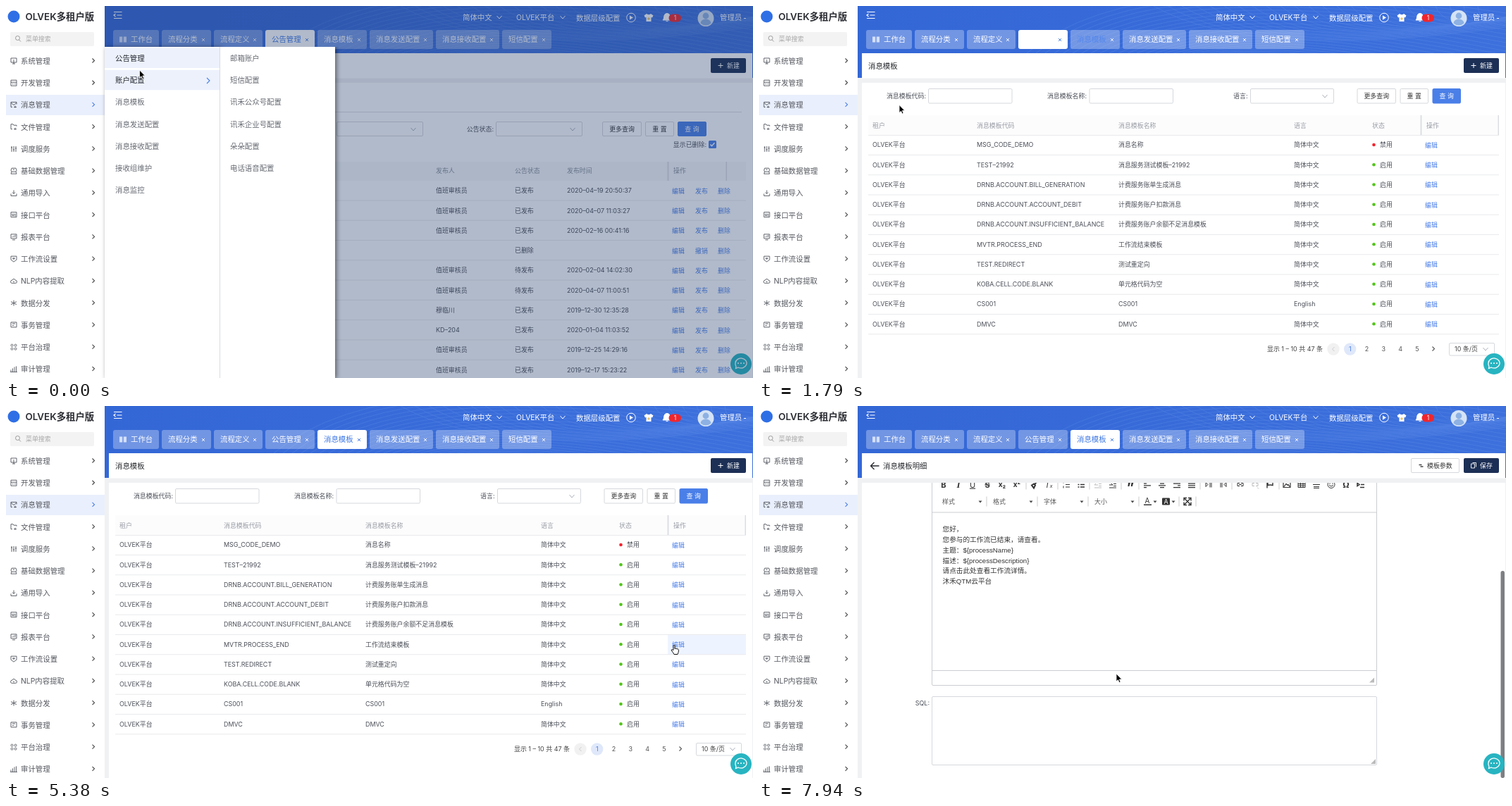
Animation of 1060x528 px, one loop 8 s. Source, as an HTML page:

```html
<!DOCTYPE html>
<html lang="zh-CN">
<head>
<meta charset="utf-8">
<title>消息模板</title>
<style>
html, body { margin: 0; width: 100%; height: 100%; overflow: hidden; background: #fff; }
svg { display: block; width: 1060px; height: 528px; font-family: Inter, "Noto Sans CJK SC", "Noto Sans CJK", sans-serif; }
text { white-space: pre; }
.panel { filter: drop-shadow(2px 1px 3px rgba(0, 0, 0, .5)); }
.doc { font-family: "Liberation Sans", "Noto Sans CJK SC", "Noto Sans CJK", sans-serif; }
</style>
</head>
<body>
<svg id="stage" viewBox="0 0 1060 528"></svg>
<script>
const LOOP = 8000, SMALL = 8.93, BODY = 10.42;
const INK = '#4b4f58', BLUE = '#4a7fe8', NAVY = '#1c2f55', LINE = '#d6d8dc';
const BRAND = 'OLVEK', PLATFORM = BRAND + '平台';

// Drawing helpers; y is the vertical centre of the text.
const text = (x, y, s, fill = INK, size = SMALL, more = '') =>
  `<text x="${x}" y="${(y + size * .37).toFixed(2)}" fill="${fill}" font-size="${size}" ${more}>${s}</text>`;
const endText = (x, y, s, fill) => text(x, y, s, fill, SMALL, 'text-anchor="end"');
const midText = (x, y, s, fill, size) => text(x, y, s, fill, size, 'text-anchor="middle"');
const rect = (x0, y0, x1, y1, fill, more = '') =>
  `<rect x="${x0}" y="${y0}" width="${x1 - x0}" height="${y1 - y0}" fill="${fill}" ${more}/>`;
const box = (x0, y0, x1, y1, stroke = LINE, fill = '#fff') =>
  rect(x0 + .5, y0 + .5, x1 - .5, y1 - .5, fill, `stroke="${stroke}" rx="1.5"`);
const disc = (x, y, r, fill, more = '') => `<circle cx="${x}" cy="${y}" r="${r}" fill="${fill}" ${more}/>`;
const icon = (x, y, d, stroke = '#50545c', w = 1, fill = 'none') =>
  `<path transform="translate(${x} ${y})" d="${d}" stroke="${stroke}" stroke-width="${w}" fill="${fill}"/>`;
const line = (x0, y0, x1, y1, stroke = '#e9eaec') => icon(x0, y0, `M0 0L${x1 - x0} ${y1 - y0}`, stroke);
const right = (x, y, c, s = 3) => icon(x, y, `M${-s / 2} ${-s}l${s} ${s}l${-s} ${s}`, c, 1.1);
const down = (x, y, c = '#aab0ba') => icon(x, y, 'M-3.5-2L0 2L3.5-2', c);
const caret = (x, y) => icon(x, y, 'M-2.5-1h5L0 2z', 'none', 0, '#444');
const button = (x0, y0, x1, y1, s, primary) =>
  box(x0, y0, x1, y1, primary ? BLUE : LINE, primary ? BLUE : '#fff') +
  midText((x0 + x1) / 2, (y0 + y1) / 2, s, primary ? '#fff' : '#333');
const each = (list, fn) => list.map(fn).join('');
const range = (n, fn) => each([...Array(n).keys()], fn);
const during = (from, to, body) => `<g data-from="${from}" data-to="${to}">${body}</g>`;

const sideItems = [
  ['系统管理', 'M1 1h8v6H1zM3 9h4M5 3v6'],
  ['开发管理', 'M1 1h8v8H1zM1 4h8M3 6.5h1.5M6 6.5h1.5'],
  ['消息管理', 'M3 8H1V1h8v3M1 2l4 3 4-3M5 8h4M7 6v3'],
  ['文件管理', 'M3 8H1V1h3l1 1.5h4V4M5 8h4M7 6v3'],
  ['调度服务', 'M2 1v8M5 1v8M8 1v8M1 3h2M4 6h2M7 4h2'],
  ['基础数据管理', 'M2 1h6l1 3-1 2H2L1 4zM2 6L1 9h8L8 6M4 3h2'],
  ['通用导入', 'M1 6v3h8V6M5 1v5M3 4l2 2 2-2'],
  ['接口平台', 'M1 1h8v7H1zM3 3v3h2V3M7 3v4'],
  ['报表平台', 'M1 1h8v6H1zM3 5V4M5 5V3M7 5V2M3 9h4'],
  ['工作流设置', 'M1 1h8v5L5 9 1 6zM3 4h4M5 3v3'],
  ['NLP内容提取', 'M2.5 8a2 2 0 0 1 0-4a2.6 2.6 0 0 1 5 0a2 2 0 0 1 0 4zM4 6h2'],
  ['数据分发', 'M5 1v8M1 3l8 4M9 3L1 7'],
  ['事务管理', 'M1 1h8v7H1zM3 3h4M3 5.5h2'],
  ['平台治理', 'M1 2.5a1.5 1.5 0 1 1 3 0a1.5 1.5 0 1 1-3 0M6 2.5a1.5 1.5 0 1 1 3 0a1.5 1.5 0 1 1-3 0M1 7.5a1.5 1.5 0 1 1 3 0a1.5 1.5 0 1 1-3 0M6 7.5a1.5 1.5 0 1 1 3 0a1.5 1.5 0 1 1-3 0'],
  ['审计管理', 'M1 9V6M3.5 9V4M6 9V2M8.5 9V1M0 9h10'],
];

function sidebar() {
  return rect(0, 0, 140, 528, '#fff') + disc(11, 15, 8.5, '#2f6fe6') +
    text(27.5, 15.5, BRAND + '多租户版', '#2b2d33', 13.4, 'font-weight="600"') +
    rect(6, 37, 125, 57, '#f3f3f4', 'rx="2"') +
    icon(17, 46, 'M-3.5-.5a3 3 0 1 1 6 0a3 3 0 1 1-6 0M1.5 2l2.5 2.5', '#999') +
    text(28, 47, '菜单搜索', '#aaa') + rect(0, 126, 140, 155, '#e9effc') +
    each(sideItems, ([name, d], i) => {
      const y = 78 + i * 31.24;
      return icon(6, y - 5, d, '#50545c', .9) + text(21, y, name, '#55585f', BODY) +
        right(124, y - .5, i === 2 ? BLUE : '#444');
    });
}

function header() {
  const mesh = range(24, i =>
    `<path d="M${380 + i * 13} 67Q${540 + i * 13} ${-70 + i * 6} 1060 ${10 + i * 6}M${560 + i * 20} 0Q${700 + i * 14} ${80 - i} ${1060 + i * 8} ${30 - i * 3}"/>`);
  return rect(140, 0, 1060, 103, 'url(#sky)') +
    `<g clip-path="url(#top)" fill="none" stroke="#9dc0ff" stroke-width=".7" opacity=".2">${mesh}</g>` +
    icon(153, 13, 'M0-4.5h11.5M4.5 0h7M0 4.5h11.5M2.5-2L0 0L2.5 2', '#fff', 1.2) +
    text(648, 16.5, '简体中文', '#fff', BODY) + down(700, 16, '#fff') +
    text(724, 16.5, PLATFORM, '#fff', BODY) + down(790, 16, '#fff') +
    text(809, 17, '数据层级配置', '#fff', BODY) +
    disc(887, 16.5, 6.3, 'none', 'stroke="#fff"') + icon(887, 16.5, 'M-2-3l5 3l-5 3z', 'none', 0, '#fff') +
    icon(912, 16.5, 'M-3-5.5Q0-3 3-5.5L6.5-3L5 0L3.5-.5V5.5h-7V-.5L-5 0L-6.5-3z', 'none', 0, '#fff') +
    disc(912, 18, 1.8, '#e9c46a') +
    icon(938, 16, 'M-6 4C-3 1-6-5 0-5.5C6-5 3 1 6 4zM-1.5 5.5h3', '#fff', 1, '#fff') +
    rect(940.5, 11.5, 958, 22.5, '#f0262d', 'rx="5.5"') + midText(949.5, 17, '1', '#fff', 8.5) +
    disc(993, 17.5, 11.5, '#d5e3f6') + disc(993, 14, 4.4, '#8db1e3') +
    icon(993, 17.5, 'M-7.5 7a7.5 6 0 0 1 15 0a11 11 0 0 1-15 0', 'none', 0, '#8db1e3') +
    text(1013, 16.5, '管理员', '#fff', BODY) + line(1047, 17.5, 1050, 17.5, '#fff');
}

const tabNames = ['工作台', '流程分类', '流程定义', '公告管理', '消息模板', '消息发送配置', '消息接收配置', '短信配置'];
const tabX = [152, 221, 295, 368, 442, 516, 610, 704, 778];
function tabs(active, switching) {
  return each(tabNames, (name, i) => {
    const x0 = tabX[i], x1 = tabX[i + 1] - 4, on = i === active;
    const incoming = switching && i === active + 1;
    const color = on ? (switching ? '#fff' : '#3d77e4') : incoming ? '#5487ec' : '#fff';
    return rect(x0, 34, x1, 61, '#fff', `rx="3" opacity="${on ? 1 : .3}"`) +
      text(x0 + (i ? 9 : 25), 47.5, name, color, BODY) +
      (i ? icon(x1 - 11, 48, 'M-2-2l4 4M2-2l-4 4', on ? '#3d77e4' : '#fff', .9)
         : icon(166, 47.5, 'M-5-4h4.2v8H-5zM.8-4H5v8H.8z', 'none', 0, '#d4dffb'));
  });
}

const titleCard = body => rect(146, 67, 1059, 102.5, '#fff') + body;
const createButton = rect(1000, 74, 1050, 95, NAVY, 'rx="2"') +
  icon(1014, 84.5, 'M-3.5 0h7M0-3.5v7', '#fff') + text(1023, 84.5, '新建', '#fff');
const surface = rect(140, 102, 1060, 528, '#f0f1f3') + rect(146, 109, 1059, 528, '#fff');
const tableHead = (y0, y1, fill, end) => rect(155, y0, 1050, y1, fill) + rect(938.5, y0, 940.5, y1, '#dcdee2') + rect(end, y0, end + 1.5, y1, '#dcdee2');

const notices = [
  ['已发布', '2020–04–19 20:50:37'], ['已发布', '2020–04–07 11:03:27'], ['已发布', '2020–02–16 00:41:16'],
  ['已删除', '', ''], ['待发布', '2020–02–04 14:02:30'], ['待发布', '2020–04–07 11:00:51'],
  ['已发布', '2019–12–30 12:35:28', '穆临川'], ['已发布', '2020–01–04 11:03:52', 'KD–204'],
  ['已发布', '2019–12–25 14:29:16'], ['已发布', '2019–12–17 15:23:22'],
];
function noticePage() {
  return surface + titleCard(createButton) + text(300, 134.5, '间') + line(146, 150.5, 1044, 150.5, '#dcdfe4') +
    box(246, 164, 366, 185) + endText(466, 175, '公告类别:') + box(469, 164, 592, 185) + down(578, 175) +
    endText(692, 175, '公告状态:') + box(695, 164, 818, 185) + down(804, 175) +
    button(846, 164, 902, 185, '更多查询') + button(907, 164, 948, 185, '重 置') + button(953, 164, 994, 185, '查 询', true) +
    endText(994, 197, '显示已删除:') + rect(997, 191, 1008, 202, BLUE, 'rx="1.5"') +
    icon(1002.5, 196.5, 'M-3 0l2 2.2l4-4.4', '#fff', 1.4) + tableHead(221, 248, '#f7f8fa', 1021.5) +
    each([[610, '发布人'], [722, '公告状态'], [796, '发布时间'], [947, '操作']], ([x, s]) => text(x, 234, s, '#8b9099')) +
    text(303, 262, '92') +
    each(notices, ([state, date, by = '值班审核员'], i) => {
      const y = 262 + i * 28.27;
      return text(610, y, by) + text(722, y, state) + text(796, y, date) + text(945, y + .5, '编辑', BLUE) +
        text(978, y + .5, state === '已删除' ? '撤销' : '发布', BLUE) + text(1010, y + .5, '删除', BLUE) +
        line(146, y + 14, 1050, y + 14);
    });
}

const templates = [
  ['MSG_CODE_DEMO', '消息名称'], ['TEST–21992', '消息服务测试模板–21992'],
  ['DRNB.ACCOUNT.BILL_GENERATION', '计费服务账单生成消息'], ['DRNB.ACCOUNT.ACCOUNT_DEBIT', '计费服务账户扣款消息'],
  ['DRNB.ACCOUNT.INSUFFICIENT_BALANCE', '计费服务账户余额不足消息模板'], ['MVTR.PROCESS_END', '工作流结束模板'],
  ['TEST.REDIRECT', '测试重定向'], ['KOBA.CELL.CODE.BLANK', '单元格代码为空'], ['CS001', 'CS001'], ['DMVC', 'DMVC'],
];
const ROW_TOP = 183, ROW_STEP = 28.25;
function listPage() {
  return surface + titleCard(text(155, 85, '消息模板', '#26282d', BODY) + createButton) +
    endText(237, 128, '消息模板代码:') + box(240, 117, 359.5, 138.5) + endText(465, 128, '消息模板名称:') +
    box(468.5, 117, 588, 138.5) + endText(693.5, 128, '语言:') + box(697, 117, 816, 138.5) + down(803, 128) +
    '<rect id="fieldHover" x="240.5" y="117.5" width="118.5" height="20.5" rx="1.5" fill="none" stroke="#7aa7f5"/>' +
    button(848.5, 117, 904, 138.5, '更多查询') + button(909.5, 117, 950, 138.5, '重 置') + button(955.5, 117, 996, 138.5, '查 询', true) +
    tableHead(155, 183, '#fcfcfd', 1048.5) +
    each([[161, '租户'], [309, '消息模板代码'], [510, '消息模板名称'], [759, '语言'], [870, '状态'], [947, '操作']],
      ([x, s]) => text(x, 169.5, s, '#989ca4')) +
    `<rect id="rowHover" height="${ROW_STEP}" fill="#eef4ff"/>` + line(155, 183.5, 1050, 183.5) +
    each(templates, ([code, name], i) => {
      const y = 197 + i * ROW_STEP;
      return text(161, y, PLATFORM) + text(309, y, code) + text(510, y, name) +
        text(759, y, code === 'CS001' ? 'English' : '简体中文') + disc(872.5, y, 2.3, i ? '#52c41a' : '#f5222d') +
        text(881, y, i ? '启用' : '禁用') + text(945, y + .5, '编辑', BLUE) + line(155, y + 14.5, 1050, y + 14.5);
    }) +
    text(721, 487, '显示 1 – 10 共 47 条', '#444') + disc(815, 487, 8.7, '#f1f1f2') + icon(815, 487, 'M1.5-3l-3 3l3 3', '#ccc') +
    disc(838.7, 487, 8.7, '#dfe8fa') + range(5, i => midText(838.7 + i * 23.8, 487, i + 1, i ? '#555' : BLUE)) +
    right(957, 486.5, '#555') + box(979, 478, 1044, 496.5) + text(987, 487, '10 条/页', '#444') + down(1031, 487);
}

const alignLines = [[5, 2, 5, 2], [5, 3, 5, 3], [2, 5, 2, 5], [5, 5, 5, 5]];
function toolbar() {
  const D = '#333', G = '#bbb', clip = 'M-4-4h8v9h-8zM-2-5.5h4v2h-4z';
  const undo = 'M-5 0l4-4v2.5c4 0 5 2 6 5c-2-2-3-2-6-2V4z', redo = 'M5 0l-4-4v2.5c-4 0-5 2-6 5c2-2 3-2 6-2V4z';
  const glyph = (x, s, style = '', size = 11, y = 293) => text(x, y, s, D, size, `text-anchor="middle" ${style}`);
  const bold = 'font-weight="700"';
  const top = [
    [262, 'M3 4v1h-7V-5h5l3 3v2M-1 1a2 2 0 1 1 4 0a2 2 0 1 1-4 0M2.5 2.5L5 5'],
    [287, 'M-3-5L2 3M3-5L-2 3M-4 3.5a1.5 1.5 0 1 1 3 0a1.5 1.5 0 1 1-3 0M1 3.5a1.5 1.5 0 1 1 3 0a1.5 1.5 0 1 1-3 0', G],
    [307, 'M-4-5h5v6h-5zM-1-2h5v7h-5z', G], [328, clip + 'M-2-1h4M-2 1h4M-2 3h4'],
    [349, clip + 'M-2-1h4M0-1v5'], [370, clip + 'M-2 0h4v3h-4z'],
    [439, 'M-4-1a3 3 0 1 1 6 0a3 3 0 1 1-6 0M1.5 1.5L5 5', D, 1.7], [485, 'M-5-4h10M-5-2h10M-5 0h10M-5 2h10M-3 4h5', D, 1.5],
  ];
  const middle = [
    [391, 'M4-5L0 0M-4 1l3-2l2 2l-2 4z', D, 2], [436, 'M-1-3.5h6M-1 0h6M-1 3.5h6M-4-5v3M-4 2v3'],
    [457, 'M-1-3.5h6M-1 0h6M-1 3.5h6M-4.5-3.5h2M-4.5 0h2M-4.5 3.5h2', D, 1.4],
    [481, 'M-5-4h10M1-1h4M1 2h4M-5 4.5h10M0 .5h-5l2-2', G], [502, 'M-5-4h10M1-1h4M1 2h4M-5 4.5h10M-5 .5h5l-2-2'],
    [638, 'M-4-3l3 3l-3 3zM2-4v8M4-4v8M4-4H1'], [659, 'M4-3l-3 3l3 3zM-2-4v8M-4-4v8M-4-4h3'],
    [683, 'M-1-2h-3v4h3M1-2h3v4h-3M-2 0h4'], [704, 'M-1-2h-3v4h3M1-2h3v4h-3M3 4l2 2', G],
    [725, 'M-4-5v10M-3-3q3-2 7 0v4q-4-1-7 0z', D, 1.4], [749, 'M-5-4h10v8h-10zM-4 3l3-4l2 2l1-1l2 3', D, 1.2],
    [770, 'M-5-4h10v8h-10zM-5-1h10M-5 1.5h10M-1.5-4v8M2-4v8'], [791, 'M-4-5h8M-4-3h8M-5 0h10M-4 3h8M-4 5h8', D, 1.2],
    [812, 'M-5 0a5 5 0 1 1 10 0a5 5 0 1 1-10 0M-2-2v1.5M2-2v1.5M-3 1q3 3 6 0'],
    [854, 'M-5-2v4l3-2zM-1-4h6M0 0h5M-1 4h6', D, 1.5],
  ];
  const sep = (y, xs) => each(xs, x => line(x, y - 7, x, y + 7, '#ccc'));
  return each(top, ([x, d, c = D, w = 1]) => icon(x, 268, d, c, w)) + icon(394, 268, undo, 'none', 0, G) + icon(415, 268, redo, 'none', 0, G) +
    text(460, 266, 'b', D, 9, 'text-anchor="end" font-weight="700"') + text(461, 270, 'a', D, 9, bold) +
    sep(268, [275, 382, 428, 472, 497]) +
    glyph(262, 'B', bold) + glyph(283, 'I', bold + ' font-style="italic" font-family="Liberation Serif, serif"', 13) +
    glyph(303, 'U', 'text-decoration="underline"') + glyph(324, 'S', bold + ' text-decoration="line-through"') +
    glyph(345, 'x₂', bold, 10) + glyph(366, 'x²', bold, 10) + glyph(411, 'T<tspan font-size="7">x</tspan>', 'font-style="italic"') +
    glyph(527, '”', bold, 20, 297) + glyph(833, 'Ω', bold, 12) +
    each(middle, ([x, d, c = D, w = 1]) => icon(x, 293, d, c, w)) +
    each(alignLines, (half, i) => icon(551 + i * 21, 293, each(half, (h, k) => {
      const w = h * 2, x0 = i === 1 ? -h : i === 2 ? 5 - w : -5;
      return `M${x0} ${k * 2.7 - 4}h${w}`;
    }), D, 1.3)) + sep(293, [379, 424, 469, 514, 539, 626, 671, 738]) +
    each(['样式', '格式', '字体', '大小'], (s, i) => text(260 + i * 72, 317, s, '#555') + caret(314 + i * 72, 317) + sep(317, [323 + i * 72])) +
    midText(551, 316, 'A', D, 10) + rect(546, 321, 557, 322.5, D) + caret(562, 317) +
    rect(572, 312, 583, 322, D, 'rx="1"') + midText(577.5, 317, 'A', '#fff', 9) + caret(588, 317) +
    icon(608, 317, 'M-5-1v-4h4M1-5h4v4M5 1v4h-4M-1 5h-4v-4M-4-4l8 8M4-4l-8 8', D, 1.4) + sep(317, [596, 620]);
}

const letter = ['您好，', '您参与的工作流已结束，请查看。', '主题：${processName}', '描述：${processDescription}', '请点击此处查看工作流详情。', '沐禾QTM云平台'];
function detailPage() {
  const req = '<tspan fill="#f5222d">*</tspan> ';
  const grip = (x, y) => icon(x, y, 'M0-7v7h-7z', 'none', 0, '#bbb');
  const form = endText(241, 128, '租户:') + endText(241, 155, '消息模板代码:') + endText(241, 181.5, req + '消息模板标题:') +
    endText(241, 208, '外部编码:') + endText(241, 235.5, '启用:') + endText(241, 262.5, req + '消息模板内容:') +
    endText(552, 155, req + '消息模板名称:') + endText(552, 181.5, req + '语言:') + endText(552, 208, '消息子类型:') +
    box(244, 171, 423.5, 192, '#a3c3f5') + box(244, 198, 423.5, 218.5) + box(555, 144, 734, 165, '#a3c3f5') +
    box(555, 171, 734, 192, '#a9c5ee', '#ebf2fd') + down(720, 181.5) + icon(720, 208, 'M-1.5-.5L0 1L1.5-.5', '#aaa');
  const values = text(244, 128, PLATFORM) + text(244, 155, 'MVTR.PROCESS_END') +
    text(251, 182, '您参与的工作流已结束【${processName') + text(562, 155, '工作流结束模板') + text(564, 181.5, '简体中文');
  const toggle = on => rect(244, 228, 282, 242, on ? '#a9c8f6' : '#d5d8de') +
    rect(on ? 261 : 244, 228, on ? 282 : 265, 242, on ? '#2f7cec' : '#aeb3bc', 'rx="1.5"') +
    disc(on ? 271.5 : 254.5, 235, 3.4, 'none', 'stroke="#fff" stroke-width="1.2"');
  const sql = y => endText(242, y + 10, 'SQL:') + box(245, y, 877, y + 98) + grip(875, y + 96);
  const editor = box(245, 252.5, 877, 578.5, '#cbcdd1') + line(245, 332.5, 877, 332.5, '#cbcdd1') +
    line(245, 557, 877, 557, '#cbcdd1') + grip(873, 574) + toolbar();
  return surface + `<g clip-path="url(#body)"><g id="scroll">` + form + during(6280, LOOP, values) +
    during(5680, 6750, toggle(false) + box(245, 253, 877, 303) + sql(315)) +
    during(6750, LOOP, toggle(true) + editor + sql(593.5)) +
    during(7050, LOOP, '<g class="doc">' + each(letter, (s, i) => text(260.5, 356 + i * 14.85, s, '#333', 9.67)) + '</g>') +
    '</g></g>' + titleCard(icon(164.5, 85, 'M6 0H-6M-1-5L-6 0L-1 5', '#26282d', 1.3) + text(176, 85, '消息模板明细', '#26282d', BODY) +
      box(925, 74, 994, 95) + icon(939.5, 84.5, 'M-3-1h4M-1 1.5h4', '#444', 1.4) + text(948, 84.5, '模板参数', '#333') +
      rect(1000, 74, 1050, 95, NAVY, 'rx="2"') + icon(1014, 84.5, 'M-3.5-2.5h5v6h-5zM-1.5-4h5v6', '#fff', .9) + text(1023, 84.5, '保存', '#fff')) +
    '<rect id="thumb" x="1052.5" width="5.5" height="294" rx="2.7" fill="#7d7f83"/>';
}

const mainMenu = ['公告管理', '账户配置', '消息模板', '消息发送配置', '消息接收配置', '接收组维护', '消息监控'];
const subMenu = ['邮箱账户', '短信配置', '讯禾公众号配置', '讯禾企业号配置', '朵朵配置', '电话语音配置'];
function menu(hover) {
  return each(mainMenu, (s, i) => {
    const y = 74 + i * 31.25, lit = i === 0 || i === hover;
    return (lit ? rect(140, Math.max(58, y - 14.5), 303, y + 14, '#ecf1fc') : '') +
      text(155, y, s, lit ? '#25282e' : '#666a72', BODY) + (i === 1 ? right(287, 106, i === hover ? BLUE : '#c4c8d0', 4) : '');
  });
}
// The submenu lies above the main menu and hides its shadow.
const menus = '<g class="panel">' + rect(140, 58, 303.5, 528, '#fff') + during(0, 600, menu(1)) + during(600, 1790, menu(2)) + '</g>' +
  '<g id="sub"><g clip-path="url(#subArea)"><g class="panel">' + rect(303, 58, 467, 528, '#fff') +
  each(subMenu, (s, i) => text(318, 74 + i * 31.25, s, '#666a72', BODY)) + '</g></g>' + line(303.5, 58, 303.5, 528, '#d9dbe0') + '</g>';

const chat = disc(1043, 508, 15, '#27b4c1') +
  icon(1043, 507, 'M-8 0a8 7 0 1 1 4 6l-3.5 1.5l.5-3A7 7 0 0 1-8 0', '#fff', 1.3) + each([-4, 0, 4], d => disc(1043 + d, 507, 1, '#fff'));

const cursorShapes = {
  arrow: icon(0, 0, 'M0 0V11L2.5 8.7L4.2 12.6L6 11.8L4.4 8H7.8z', '#fff', .8, '#000'),
  hand: icon(0, 0, 'M-1 7V.8a1 1 0 0 1 2 0V5l1.5-.3l1.5.5l1.5.3q1 .4 1 1.5q0 3-1.5 6h-5Q-1.5 10-3.7 7.5q-.3-1.6 1.2-1.2z', '#111', 1, '#fff'),
  beam: icon(0, 0, 'M-2.5-6.5Q0-6.5 0-5Q0-6.5 2.5-6.5M0-5V5M-2.5 6.5Q0 6.5 0 5Q0 6.5 2.5 6.5M-1.5 1.5h3', '#222', 1.1),
};

document.getElementById('stage').innerHTML = `<defs>
  <linearGradient id="sky"><stop offset="0" stop-color="#3467d6"/><stop offset="1" stop-color="#3d70dc"/></linearGradient>
  <clipPath id="top"><rect x="140" width="920" height="67"/></clipPath>
  <clipPath id="subArea"><rect x="303" y="58" width="180" height="470"/></clipPath>
  <clipPath id="body"><rect x="146" y="109" width="914" height="419"/></clipPath></defs>` +
  header() + during(0, 1790, tabs(3)) + during(1790, 1940, tabs(3, true)) + during(1940, LOOP, tabs(4)) +
  during(0, 1790, noticePage()) + during(1790, 5680, listPage()) + during(5680, LOOP, detailPage()) + chat +
  during(0, 1790, rect(140, 0, 1060, 528, '#203a68', 'opacity=".35"')) + sidebar() + during(0, 1790, menus) +
  '<g id="cursor">' + each(Object.keys(cursorShapes), k => `<g data-shape="${k}">${cursorShapes[k]}</g>`) + '</g>';

// time, x, y, shape
const path = [
  [0, 189.5, 91, 'arrow'], [150, 189, 94, 'arrow'], [300, 189, 97, 'arrow'], [600, 194, 122, 'hand'], [750, 198, 136, 'hand'],
  [890, 199.5, 141.5, 'hand'], [1790, 199, 140.5, 'arrow'], [2540, 232, 140, 'arrow'], [2690, 300, 133, 'beam'],
  [2840, 385, 160, 'arrow'], [2990, 450, 213, 'arrow'], [3140, 492, 254, 'arrow'], [3290, 510.5, 275.5, 'beam'],
  [3590, 513, 330, 'beam'], [3730, 516, 374, 'arrow'], [4630, 560, 366, 'arrow'], [4780, 680, 340, 'arrow'],
  [4930, 800, 312, 'arrow'], [5080, 885, 296, 'arrow'], [5230, 966, 318, 'arrow'], [5380, 948, 339.5, 'hand'],
  [6430, 900, 345, 'arrow'], [6600, 780, 352, 'arrow'], [6750, 650, 364, 'arrow'], [6900, 560, 374, 'arrow'],
  [7050, 507.5, 380, 'beam'], [7940, 507, 380, 'arrow'],
];
const scrollSteps = [[0, 0], [7490, 100], [7640, 181.5]];
const at = (steps, t) => steps.findLast(s => s[0] <= t);

const [cursor, sub, rowHover, fieldHover, scroller, thumb] =
  ['cursor', 'sub', 'rowHover', 'fieldHover', 'scroll', 'thumb'].map(id => document.getElementById(id));
const layers = [...document.querySelectorAll('[data-from]')];
const show = (el, on) => { el.style.display = on ? '' : 'none'; };

function render(t) {
  for (const el of layers) show(el, t >= +el.dataset.from && t < +el.dataset.to);
  const [, x, y, shape] = at(path, t);
  cursor.setAttribute('transform', `translate(${x} ${y})`);
  for (const el of cursor.children) show(el, el.dataset.shape === shape);

  show(sub, t < 890);
  sub.setAttribute('opacity', t < 750 ? 1 : .5);

  const row = Math.floor((y - ROW_TOP) / ROW_STEP);
  const left = t >= 5230 && t < 5530 ? 939 : 155;
  show(rowHover, row >= 0);
  rowHover.setAttribute('x', left);
  rowHover.setAttribute('width', 1050 - left);
  rowHover.setAttribute('y', ROW_TOP + Math.max(row, 0) * ROW_STEP);
  show(fieldHover, x > 240 && x < 360 && y < 138);

  const offset = at(scrollSteps, t)[1];
  scroller.setAttribute('transform', `translate(0 ${-offset})`);
  show(thumb, offset > 0);
  thumb.setAttribute('y', 109 + offset / 181.5 * 125);
}

const start = performance.now();
function tick() {
  render((performance.now() - start) % LOOP);
  requestAnimationFrame(tick);
}
tick();
</script>
</body>
</html>
```
